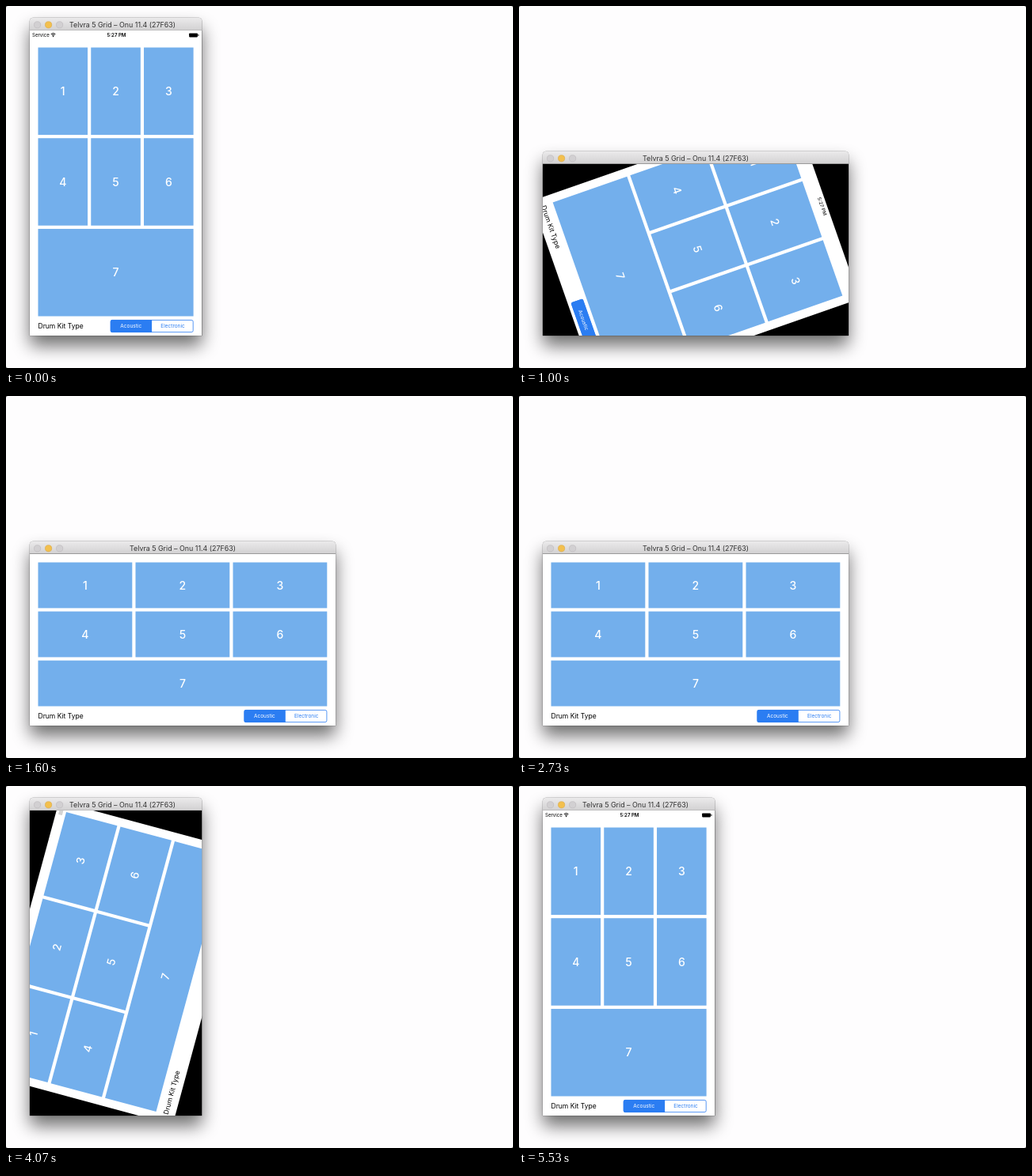
Write an HTML page that moves like this. It is 640 px wide and 458 px high and loops after 5590 ms.

```html
<!DOCTYPE html>
<html lang="en">
<head>
<meta charset="utf-8">
<title>Drum pads rotating</title>
<style>
  html, body { margin: 0; width: 100%; height: 100%; overflow: hidden; background: #fefdfe; }
  svg { display: block; width: 640px; height: 458px; font-family: Inter, Roboto, sans-serif; }
  text { text-anchor: middle; }
  .start { text-anchor: start; }
  .pad rect { fill: #73afec; }
  .pad text { fill: #fff; font-size: 14px; font-weight: 500; }
  .segment text { font-size: 6.5px; }
</style>
</head>
<body>
<svg viewBox="0 0 640 458">
  <defs>
    <linearGradient id="bar" x2="0" y2="1">
      <stop stop-color="#ebeaeb"/>
      <stop offset="1" stop-color="#d1d0d1"/>
    </linearGradient>
    <filter id="blur" x="-30%" y="-30%" width="160%" height="160%">
      <feGaussianBlur stdDeviation="11"/>
    </filter>
    <clipPath id="screenClip"><rect id="clipRect"/></clipPath>
  </defs>
  <rect width="640" height="458" fill="#555"/>
  <rect width="640" height="458" rx="2.5" fill="#fefdfe"/>

  <rect id="shadow" x="30" rx="4" fill="#000" opacity=".56" filter="url(#blur)"/>
  <path id="outline" fill="none" stroke="#000" stroke-opacity=".28"/>
  <g id="titleBar">
    <path id="barShape" fill="url(#bar)"/>
    <path id="barLine"/>
    <g stroke-width=".6">
      <circle cx="39.6" cy="8.8" r="4.1" fill="#d2d0d2" stroke="#bab8ba"/>
      <circle cx="53.6" cy="8.8" r="4.1" fill="#f3c04e" stroke="#d9a640"/>
      <circle cx="67.6" cy="8.8" r="4.1" fill="#d2d0d2" stroke="#bab8ba"/>
    </g>
    <text id="title" y="12.1" font-size="8.9" fill="#333">Telvra 5 Grid – Onu 11.4 (27F63)</text>
  </g>

  <g clip-path="url(#screenClip)">
    <rect id="backdrop"/>
    <g id="content">
      <rect id="page" fill="#fff"/>
      <g id="status" font-size="6.1">
        <text class="start" x="3" y="8.2">Service</text>
        <g fill="none" stroke="#000" stroke-width="1">
          <path d="M26.8 4.6q2.8 -2.4 5.6 0M27.9 6q1.7 -1.4 3.4 0"/>
        </g>
        <circle cx="29.6" cy="7.4" r=".8"/>
        <text id="clock" y="8.2" font-weight="600">5:27 PM</text>
        <g id="battery">
          <rect x="-16.2" y="3.4" width="10.8" height="5" rx=".8"/>
          <rect x="-4.9" y="5" width="1" height="1.8"/>
        </g>
      </g>
      <g id="pads"></g>
      <g id="footer">
        <text class="start" x="10.5" y="-8.9" font-size="8.5">Drum Kit Type</text>
        <g id="segment" class="segment">
          <rect x="-115.1" y="-19.6" width="104" height="15.2" rx="2" fill="#fff" stroke="#2b7df2" stroke-width=".8"/>
          <path d="M-63.2 -20H-113.5a2 2 0 0 0 -2 2v12a2 2 0 0 0 2 2H-63.2z" fill="#2b7df2"/>
          <text x="-89.6" y="-9.6" fill="#fff">Acoustic</text>
          <text x="-36.8" y="-9.6" fill="#2b7df2">Electronic</text>
        </g>
      </g>
    </g>
  </g>
</svg>
<script>
const LOOP = 5590;
const FRAME = 200 / 3;
const TURN = 287;
const TO_LANDSCAPE = 908;
const TO_PORTRAIT = 3985;
const LEFT = 30, BOTTOM = 417, BAR = 16;

const portrait = { width: 217.3, height: 386, top: 21.5 };
const landscape = { width: 386, height: 217, top: 10.5 };

const el = id => document.getElementById(id);
const lerp = (a, b, k) => a + (b - a) * k;
function set(node, attrs) {
  for (const key in attrs) node.setAttribute(key, attrs[key]);
}
function make(tag, parent) {
  return parent.appendChild(document.createElementNS("http://www.w3.org/2000/svg", tag));
}

const pads = Array.from({ length: 7 }, (_, i) => {
  const group = make("g", el("pads"));
  group.setAttribute("class", "pad");
  const rect = make("rect", group);
  const label = make("text", group);
  label.textContent = i + 1;
  return { rect, label };
});

// Cubic bezier (.42, 0, .58, 1), solved by bisection.
function easeInOut(x) {
  if (x <= 0) return 0;
  if (x >= 1) return 1;
  let low = 0, high = 1, u;
  for (let i = 0; i < 24; i++) {
    u = (low + high) / 2;
    const v = 1 - u;
    if (1.26 * u * v * v + 1.74 * u * u * v + u ** 3 < x) low = u;
    else high = u;
  }
  return u * u * (3 - 2 * u);
}

function drawWindow(size, wide) {
  const { width, height } = size;
  const top = BOTTOM - height;
  const barTop = top - BAR;
  const right = LEFT + width;
  const screen = { x: LEFT, y: top, width, height };
  set(el("shadow"), { y: barTop + 13, width, height: height + BAR });
  set(el("outline"), {
    d: `M${LEFT} ${BOTTOM}V${barTop + 4}q0 -4 4 -4H${right - 4}q4 0 4 4V${BOTTOM}z`
  });
  set(el("titleBar"), { transform: `translate(0 ${barTop})` });
  set(el("barShape"), { d: `M${LEFT} ${BAR}V4q0 -4 4 -4H${right - 4}q4 0 4 4V${BAR}z` });
  set(el("barLine"), { d: `M${LEFT} ${BAR - .4}H${right}`, stroke: wide ? "#858485" : "#b8b7b8", "stroke-width": .8 });
  set(el("title"), { x: wide ? 223 : 147 });
  set(el("clipRect"), screen);
  set(el("backdrop"), screen);
}

function drawContent(size, upright, angle) {
  const width = lerp(landscape.width, portrait.width, upright);
  const height = lerp(landscape.height, portrait.height, upright);
  const top = lerp(landscape.top, portrait.top, upright);
  const cx = LEFT + size.width / 2, cy = BOTTOM - size.height / 2;
  set(el("content"), {
    transform: `translate(${cx} ${cy}) rotate(${angle}) translate(${-width / 2} ${-height / 2})`
  });
  set(el("page"), { width, height });
  set(el("status"), { opacity: upright });
  set(el("clock"), { x: width / 2 + .8 });
  set(el("battery"), { transform: `translate(${width} 0)` });
  set(el("footer"), { transform: `translate(0 ${height})` });
  set(el("segment"), { transform: `translate(${width} 0)` });

  const margin = 10.5, gap = 4.2;
  const full = width - 2 * margin - .2;
  const cellW = (full - 2 * gap) / 3;
  const cellH = (height - 24.5 - top - 2 * gap) / 3;
  pads.forEach(({ rect, label }, i) => {
    const x = margin + (i % 3) * (cellW + gap);
    const y = top + Math.floor(i / 3) * (cellH + gap);
    const w = i === 6 ? full : cellW;
    set(rect, { x, y, width: w, height: cellH });
    set(label, { x: x + w / 2, y: y + cellH / 2 + 5.1 });
  });
}

function render(time) {
  const t = Math.floor((time % LOOP + 3.4) / FRAME) * FRAME;
  const wide = t >= TO_LANDSCAPE && t < TO_PORTRAIT;
  const size = wide ? landscape : portrait;
  let progress = 1;
  if (wide) progress = easeInOut((t - TO_LANDSCAPE) / TURN);
  else if (t >= TO_PORTRAIT) progress = easeInOut((t - TO_PORTRAIT) / TURN);
  drawWindow(size, wide);
  drawContent(size, wide ? 1 - progress : progress, (wide ? 90 : -90) * (1 - progress));
}

const begin = performance.now();
function tick() {
  render(performance.now() - begin);
  requestAnimationFrame(tick);
}
tick();
</script>
</body>
</html>
```
